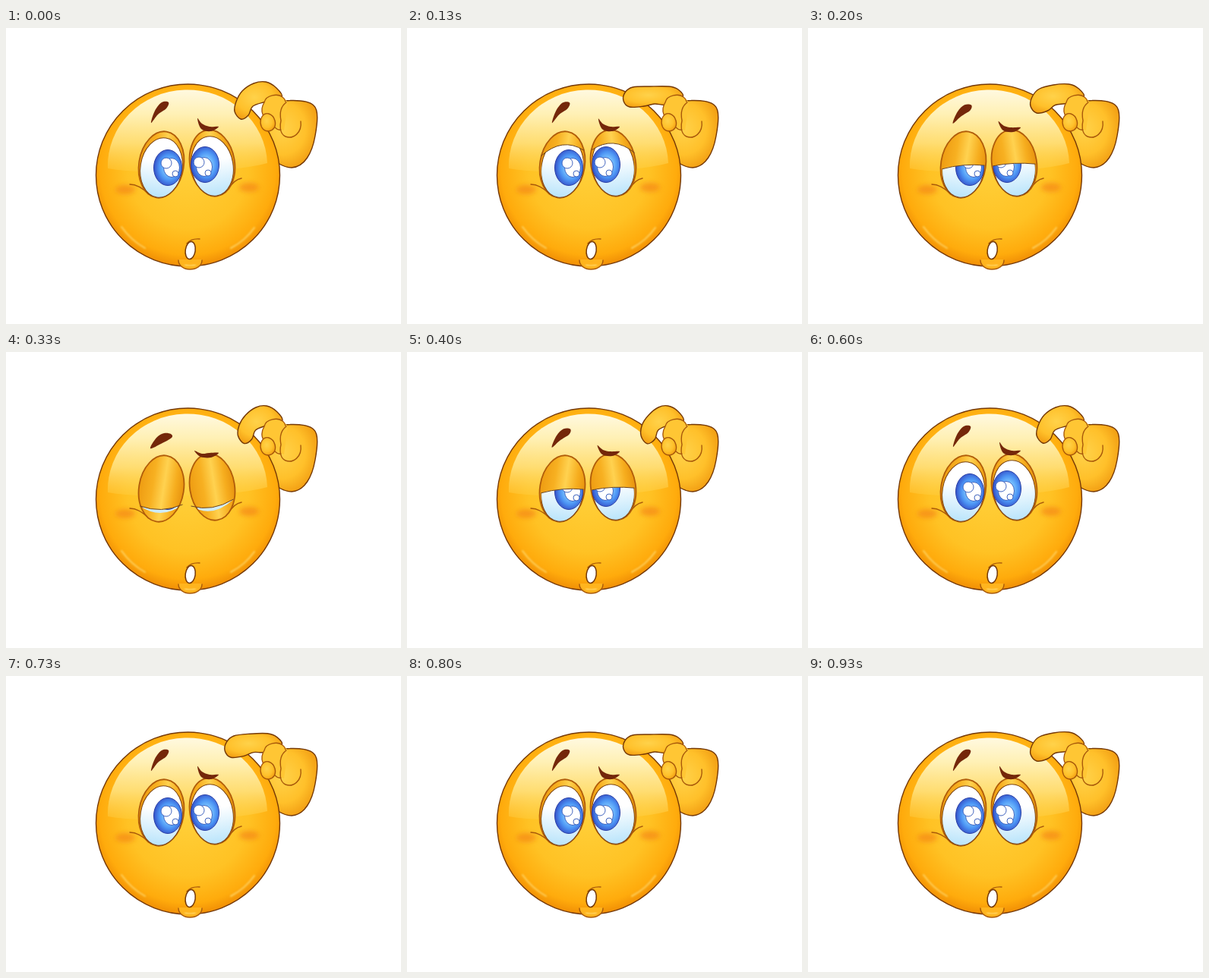
Animation of 520x390 px, one loop 0.99 s. Source, as an HTML page:

```html
<!DOCTYPE html>
<html lang="en">
<head>
<meta charset="utf-8">
<title>Puzzled face</title>
<style>
  html, body { margin: 0; width: 100%; height: 100%; overflow: hidden; background: #fff; }
  svg { display: block; width: 100%; height: 100%; }
  .edge { stroke: #743806; stroke-width: 1.4; stroke-linejoin: round; }
  .line { fill: none; stroke: #a8590a; stroke-width: 1.4; stroke-linecap: round; }
  .shine { fill: none; stroke: #ffe07a; stroke-width: 2; stroke-linecap: round; opacity: .75; filter: url(#soft); }
  .blush { fill: #f58a12; opacity: .75; filter: url(#blur); }
  .rim { fill: none; stroke: #6b4420; }
</style>
</head>
<body>
<svg viewBox="0 0 520 390">
  <defs>
    <filter id="soft" x="-30%" y="-30%" width="160%" height="160%"><feGaussianBlur stdDeviation="1"/></filter>
    <filter id="blur" x="-50%" y="-80%" width="200%" height="260%"><feGaussianBlur stdDeviation="3"/></filter>
    <radialGradient id="skin" cx=".5" cy=".46" r=".55">
      <stop offset="0" stop-color="#ffd03a"/><stop offset=".6" stop-color="#ffc224"/>
      <stop offset=".87" stop-color="#ffab0c"/><stop offset="1" stop-color="#ee8a04"/>
    </radialGradient>
    <linearGradient id="gloss" x1="0" y1="0" x2="0" y2="1">
      <stop offset="0" stop-color="#fff9e0"/><stop offset=".3" stop-color="#fff0b4"/>
      <stop offset=".65" stop-color="#ffe07a" stop-opacity=".9"/><stop offset="1" stop-color="#ffd24a" stop-opacity=".3"/>
    </linearGradient>
    <radialGradient id="hand" cx=".42" cy=".42" r=".65">
      <stop offset="0" stop-color="#ffd24a"/><stop offset=".6" stop-color="#ffc02a"/><stop offset="1" stop-color="#f09a10"/>
    </radialGradient>
    <linearGradient id="lid">
      <stop offset="0" stop-color="#ee9c12"/><stop offset=".3" stop-color="#f7b021"/><stop offset=".55" stop-color="#ffd250"/>
      <stop offset=".8" stop-color="#f6ad1e"/><stop offset="1" stop-color="#e8930e"/>
    </linearGradient>
    <linearGradient id="ball" x1="0" y1="0" x2="0" y2="1">
      <stop offset=".4" stop-color="#fff"/><stop offset="1" stop-color="#b9e4fb"/>
    </linearGradient>
    <radialGradient id="iris" cx=".55" cy=".5" r=".55">
      <stop offset=".3" stop-color="#7cc6ff"/><stop offset=".65" stop-color="#4c94f4"/><stop offset="1" stop-color="#3450c8"/>
    </radialGradient>
    <clipPath id="open0"><path/></clipPath>
    <clipPath id="open1"><path/></clipPath>
  </defs>

  <path class="edge" fill="url(#hand)" d="M354 106C358 98 364 95.500 374 95.500C390 95 400 97 405 102C412 108 410 125 407 142C403 165 393 183 376 184C368 184 363 181 358 178L330 130Z"/>
  <ellipse class="edge" cx="239.5" cy="194" rx="121" ry="120" fill="url(#skin)"/>
  <path fill="url(#gloss)" d="M134 185A105 100 0 0 1 344 178C300 190 190 194 134 185Z"/>
  <path class="shine" d="M152 262Q165 280 183 290M327 263Q315 280 296 290"/>
  <ellipse class="blush" cx="157" cy="213" rx="13" ry="6"/>
  <ellipse class="blush" cx="320" cy="210" rx="13" ry="6"/>
  <path class="line" d="M163 206Q175 206 188 219M310 198Q300 200 293 212"/>

  <path fill="#ffb41e" d="M227 305C227 313 234 318 242 318C251 318 258 313 258 305Z"/>
  <path class="line" d="M227 306C227 313 234 318 242 318C251 318 258 313 258 306M238 284Q244 277 255 278"/>
  <path class="shine" d="M236 312Q242 315 249 312"/>
  <ellipse cx="242.7" cy="293" rx="6.5" ry="11.5" transform="rotate(8 242.7 293)" fill="#fff" stroke="#743806" stroke-width="1.5"/>

  <g id="eyes"></g>
  <path id="browL" fill="#74270a"/>
  <path id="browR" fill="#74270a"/>

  <path id="finger" class="edge" fill="url(#hand)"/>
  <path fill="#ffc634" d="M340 98C342 88 358 86 364 91Q369 95 371 98L366 135L350 128L338 114C336 109 337 103 340 98Z"/>
  <path class="line" d="M338 114C336 109 337 103 340 98C342 88 358 86 364 91Q367 93 368 97"/>
  <path fill="url(#hand)" d="M345 113C339 111 335 118 335 125C336 133 341 136 346 136C352 135 356 130 354 122Z"/>
  <path class="line" d="M346 113C339 111 335 118 335 125C336 133 341 136 346 136C352 135 356 130 354 122Q352 115 346 113"/>
  <path class="line" d="M388 123C390 138 378 147 368 143C359 139 361 126 362 122C360 112 362 103 369 98M354 131Q358 135 362 134"/>
</svg>
<script>
const $ = s => document.querySelector(s);
const pts = s => s.split(' ').map(p => p.split(',').map(Number));
const mix = (a, b, k) => a.map((p, i) => p.map((v, j) => v + (b[i][j] - v) * k));

// Closed Catmull-Rom curve through all points
function curve(p) {
  const at = i => p[(i + p.length) % p.length];
  const ctrl = (i, s) => at(i).map((v, j) => v + s * (at(i + 1)[j] - at(i - 1)[j]) / 6);
  return 'M' + p[0] + p.map((_, i) => `C${ctrl(i, 1)} ${ctrl(i + 1, -1)} ${at(i + 1)}`).join('') + 'Z';
}

const fingerPoses = [
  '363,91 357,81 345,77 320,77 297,78 287,85 285,96 293,104 312,103 326,100 342,101',
  '363,91 356,79 342,71 326,73 311,83 303,97 301,110 309,120 319,115 325,103 342,97',
  '364,91 357,78 344,71 332,73 320,83 311,96 310,111 318,121 328,115 332,103 343,97'
].map(pts);
const brows = {
  browL: ['191,125 196,109 205,98 214,98 211,106 200,114', '190,127 198,113 208,107 217,108 218,113 204,121'].map(pts),
  browR: ['252,119 258,126 268,130 280,130 270,136 257,133', '248,130 258,134 268,133 280,133 270,139 256,138'].map(pts)
};
// tips: how far the lid's two ends hang, when raised and when shut
const eyes = [
  { x: 204.5, y: 180, tilt: 9, iris: [213, 184], shine: [211, 178], tips: [[[6, -3]], [[0, -2]]] },
  { x: 271.5, y: 178, tilt: -9, iris: [262, 180], shine: [254, 177], tips: [[[-2, 5]], [[2, -7]]] }
];

$('#eyes').innerHTML = eyes.map(({ x, y, tilt, iris: [ix, iy], shine: [sx, sy] }, i) => `
  <ellipse cx="${x}" cy="${y}" rx="29.5" ry="44" transform="rotate(${tilt} ${x} ${y})"
    fill="url(#lid)" stroke="#b05c0a" stroke-width="1.8"/>
  <g clip-path="url(#open${i})">
    <ellipse cx="${x}" cy="${y + 4}" rx="27.5" ry="39.5" transform="rotate(${tilt} ${x} ${y + 4})"
      fill="url(#ball)" stroke="#7a4210"/>
    <ellipse cx="${ix}" cy="${iy}" rx="18.5" ry="23.5" fill="url(#iris)" stroke="#2a3fa4"/>
    <g fill="#fff" stroke="#2f55b8" stroke-width=".9">
      <ellipse cx="${sx + 7}" cy="${sy + 6}" rx="10.5" ry="12.5"/>
      <circle cx="${sx + 12}" cy="${sy + 14}" r="4"/>
      <circle cx="${sx}" cy="${sy}" r="7"/>
    </g>
  </g>
  <path id="rim${i}" class="rim"/>`).join('');

const curl = [1, .5, 0, .5, 1, 1.5, 1.8, 2, 1.5, 1, .5, .2, 0, .2, .5];
const blink = [0, 0, .2, .6, 1, 1, .6, .2];

function draw(now) {
  const t = now % 990;
  const step = curl.findLastIndex((_, i) => Math.round(i * 20 / 3) * 10 <= t);
  const bend = curl[step], shut = blink[step] || 0;
  const from = Math.min(1, Math.floor(bend));
  $('#finger').setAttribute('d', curve(mix(fingerPoses[from], fingerPoses[from + 1], bend - from)));
  for (const id in brows) $('#' + id).setAttribute('d', curve(mix(...brows[id], shut ** 2)));

  eyes.forEach(({ x, y, tips }, i) => {
    const [[leftTip, rightTip]] = mix(...tips, shut);
    const end = y - 26 + 49 * shut, mid = y - 40 + 68 * shut;
    const sag = y + 90 - 48 * Math.max(0, shut * 2 - 1);
    const reach = shut ? 28 : 33;
    const top = `M${x - reach} ${end + leftTip}Q${x} ${2 * mid - end} ${x + reach} ${end + rightTip}`;
    $(`#open${i} path`).setAttribute('d', `${top}L${x + reach} ${y + 23 + rightTip}Q${x} ${sag} ${x - reach} ${y + 23 + leftTip}Z`);
    $('#rim' + i).setAttribute('d', shut ? top : '');
  });
  requestAnimationFrame(draw);
}
draw(performance.now());
</script>
</body>
</html>
```
